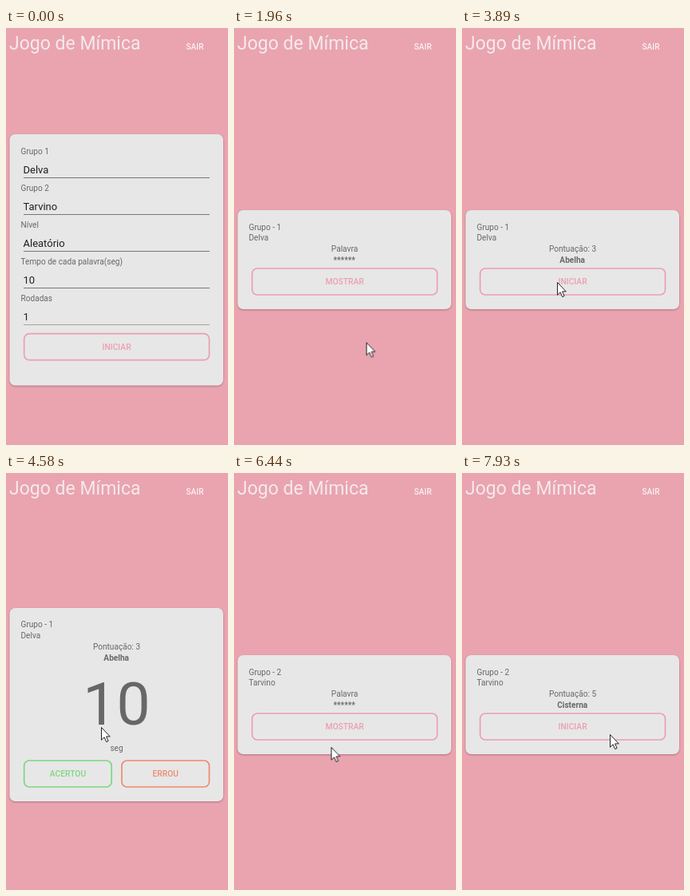
These frames come from a looping animation (278 px wide and 522 px high, 8 s). An HTML page:

```html
<!DOCTYPE html>
<html lang="pt-BR">
<head>
<meta charset="utf-8">
<title>Jogo de Mímica</title>
<style>
html, body { margin: 0; width: 100%; height: 100%; overflow: hidden; background: #e9a4b0; }
svg { display: block; width: 100%; height: 100%; font: 10.1px Roboto, sans-serif; fill: #686868; }
.title { font-size: 23px; fill: #f5e9eb; }
.exit { font-weight: 500; fill: #fbeff1; }
.value { font-size: 13px; fill: #202020; }
.line { stroke: #777; }
.line.soft { stroke: #a9a298; }
.mid { text-anchor: middle; }
.word { text-anchor: middle; font-weight: 700; }
.count { text-anchor: middle; font-size: 75px; fill: #676767; }
.card { fill: #e7e7e7; filter: drop-shadow(0 1.5px 1px rgb(90 40 50 / .4)); }
.button rect { fill: none; stroke: currentColor; stroke-width: 1.7; }
.button text { fill: currentColor; font-size: 10.3px; font-weight: 500; text-anchor: middle; }
.pink { color: #ec9fb1; }
.green { color: #7dd880; }
.orange { color: #ee8b6e; }

/* One loop is 8 s: 1% = 80 ms */
.scene { opacity: 0; animation: 8s step-end infinite; }
.form { animation-name: form; }
.hidden1 { animation-name: hidden1; }
.shown1 { animation-name: shown1; }
.play { animation-name: play; }
.ten { animation-name: ten; }
.nine { animation-name: nine; }
.hidden2 { animation-name: hidden2; }
.shown2 { animation-name: shown2; }
.start1 { animation: start1 8s linear infinite; }
.start2 { animation: start2 8s linear infinite; }
@keyframes form { 0% { opacity: 1 } 19.125%, 100% { opacity: 0 } }
@keyframes hidden1 { 0% { opacity: 0 } 19.125% { opacity: 1 } 39.75%, 100% { opacity: 0 } }
@keyframes shown1 { 0% { opacity: 0 } 39.75% { opacity: 1 } 56.625%, 100% { opacity: 0 } }
@keyframes play { 0% { opacity: 0 } 56.625% { opacity: 1 } 77.25%, 100% { opacity: 0 } }
@keyframes ten { 0% { opacity: 1 } 69.125%, 100% { opacity: 0 } }
@keyframes nine { 0% { opacity: 0 } 69.125%, 100% { opacity: 1 } }
@keyframes hidden2 { 0% { opacity: 0 } 77.25% { opacity: 1 } 94.125%, 100% { opacity: 0 } }
@keyframes shown2 { 0% { opacity: 0 } 94.125%, 100% { opacity: 1 } }
@keyframes start1 { 0%, 40% { opacity: 0 } 41.5%, 100% { opacity: 1 } }
@keyframes start2 { 0%, 94.375% { opacity: 0 } 95.875%, 100% { opacity: 1 } }

.cursor { fill: #fff; stroke: #222; stroke-width: 1; stroke-linejoin: round; animation: cursor 8s ease-in-out infinite; }
@keyframes cursor {
  0% { transform: translate(282px, 369px); }
  8.875% { transform: translate(279px, 369px); animation-timing-function: ease-out; }
  15%, 23.375% { transform: translate(167px, 396px); }
  32.25%, 46.625% { transform: translate(121px, 314px); }
  47.375% { transform: translate(130px, 324px); }
  48% { transform: translate(115px, 319px); }
  48.625%, 57.25% { transform: translate(119px, 318px); }
  70.5%, 77.25% { transform: translate(87px, 375px); animation-timing-function: ease-in; }
  80.5% { transform: translate(121px, 343px); animation-timing-function: ease-out; }
  83.625%, 100% { transform: translate(185px, 327px); }
}
</style>
</head>
<body>
<svg viewBox="0 0 278 522" preserveAspectRatio="none">
  <rect width="278" height="522" fill="#e9a4b0"/>
  <text class="title" x="4" y="27">Jogo de Mímica</text>
  <text class="exit" x="225.5" y="27">SAIR</text>
  <g id="scenes"></g>
  <path class="cursor" d="M.5 .5V16.2L4.1 12.8L6.7 18.6L9.1 17.5L6.6 11.9H11.3Z"/>
</svg>
<script>
const teams = ['Delva', 'Tarvino'];

const text = (x, y, content, cls = '') => `<text class="${cls}" x="${x}" y="${y}">${content}</text>`;
const scene = (name, ...parts) => `<g class="scene ${name}">${parts.join('')}</g>`;
const card = (top, bottom) =>
  `<rect class="card" x="4.5" y="${top}" width="267.5" height="${bottom - top}" rx="7"/>`;
const button = (label, x, y, width, cls) =>
  `<g class="button ${cls}"><rect x="${x}" y="${y}" width="${width}" height="33" rx="6.5"/>` +
  text(x + width / 2, y + 20.2, label) + '</g>';
const wideButton = (label, y, cls = '') => button(label, 22.7, y, 231.8, 'pink ' + cls);

const field = ([label, value], i) => {
  const y = 158 + i * 46.1;
  return text(18.5, y, label) + text(21.5, y + 24, value, 'value') +
    `<path class="line ${i === 4 ? 'soft' : ''}" d="M22 ${Math.round(y + 29) + .5}H255"/>`;
};

const turn = (team, y, caption, word) =>
  text(18.5, y, `Grupo - ${team}`) + text(18.5, y + 13.5, teams[team - 1]) +
  text(138.5, y + 27.3, caption, 'mid') + text(138.2, y + 41.3, word, 'word');

const turnCard = (team, caption, word) => card(228, 352) + turn(team, 252.5, caption, word);

const fields = [
  ['Grupo 1', teams[0]], ['Grupo 2', teams[1]], ['Nível', 'Aleatório'],
  ['Tempo de cada palavra(seg)', '10'], ['Rodadas', '1']
];

document.getElementById('scenes').innerHTML = [
  scene('form', card(133, 447.5), ...fields.map(field), wideButton('INICIAR', 382.7)),
  scene('hidden1', turnCard(1, 'Palavra', '******'), wideButton('MOSTRAR', 301)),
  scene('shown1', turnCard(1, 'Pontuação: 3', 'Abelha'), wideButton('INICIAR', 301, 'start1')),
  scene('play', card(169, 411), turn(1, 193.3, 'Pontuação: 3', 'Abelha'),
    scene('ten', text(138.5, 314.5, '10', 'count')),
    scene('nine', text(138.5, 314.5, '9', 'count')),
    text(138.5, 348, 'seg', 'mid'),
    button('ACERTOU', 22.7, 360, 109.5, 'green'),
    button('ERROU', 145, 360, 109.5, 'orange')),
  scene('hidden2', turnCard(2, 'Palavra', '******'), wideButton('MOSTRAR', 301)),
  scene('shown2', turnCard(2, 'Pontuação: 5', 'Cisterna'), wideButton('INICIAR', 301, 'start2'))
].join('');
</script>
</body>
</html>
```
